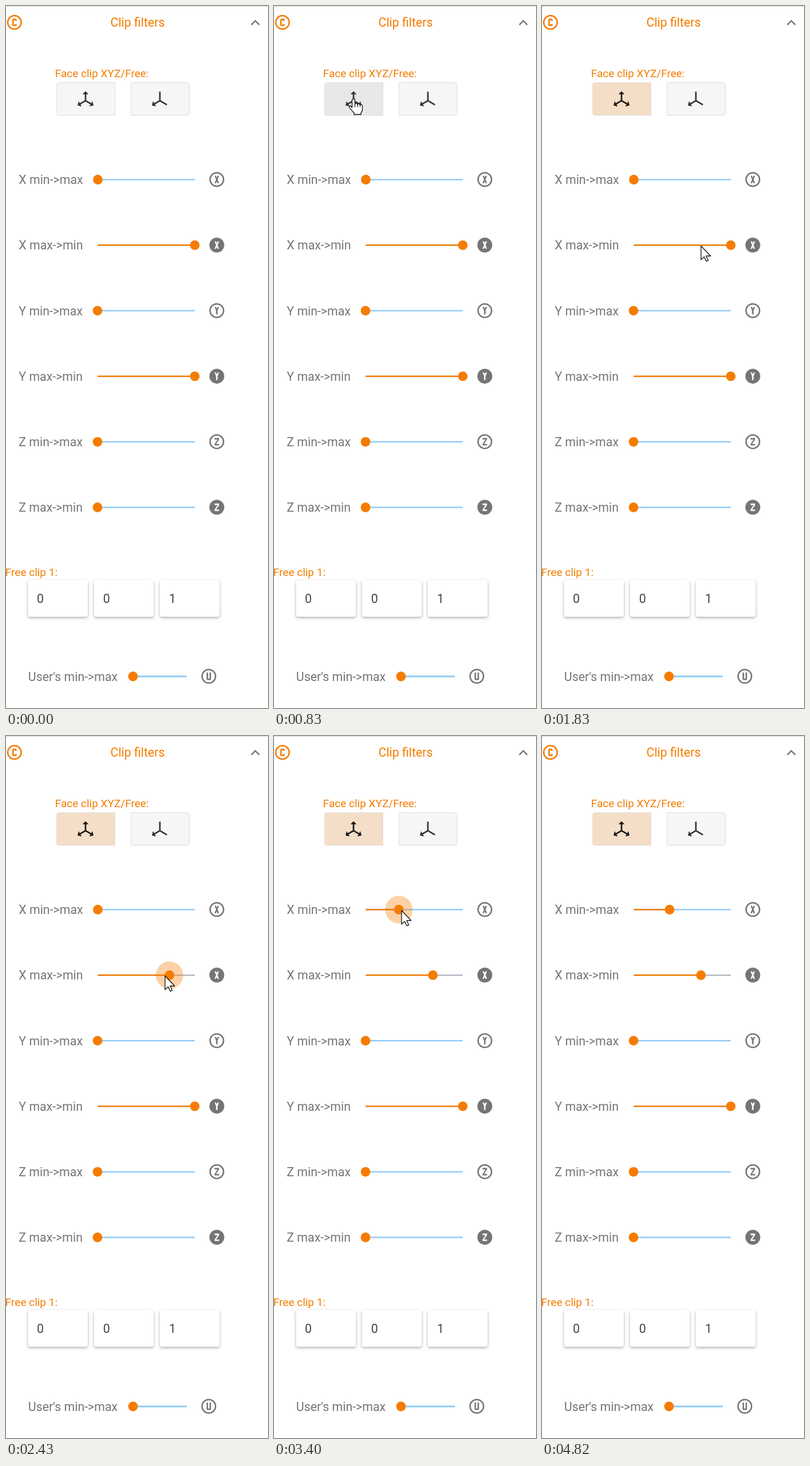
Animation of 458x1223 px, one loop 5600 ms. Source, as an HTML page with a canvas:

```html
<!DOCTYPE html>
<html lang="en">
<head>
<meta charset="utf-8">
<title>Clip filters</title>
<style>
html, body { margin: 0; width: 100%; height: 100%; overflow: hidden; background: #fff; }
canvas { display: block; width: 458px; height: 1223px; }
</style>
</head>
<body>
<canvas id="stage" width="458" height="1223"></canvas>
<script>
const ctx = document.getElementById('stage').getContext('2d');
const LOOP = 5600;
const ORANGE = '#f57c00', BLUE = '#90caf9', GRAY = '#757575', DIM = '#b5b7c4';

// Letter shapes on a 24-unit grid
const LETTERS = {
  X: 'M9 7L11 12L9 17H11L12 14.5L13 17H15L13 12L15 7H13L12 9.5L11 7Z',
  Y: 'M9 7L11 12V17H13V12L15 7H13L12 9.5L11 7Z',
  Z: 'M9 7V9H13L9 15V17H15V15H11L15 9V7Z',
  U: 'M9 7V15A2 2 0 0 0 11 17H13A2 2 0 0 0 15 15V7H13V15H11V7Z',
  C: 'M11 7A2 2 0 0 0 9 9V15A2 2 0 0 0 11 17H13A2 2 0 0 0 15 15V14H13V15H11V9H13V10H15V9A2 2 0 0 0 13 7Z'
};
for (const k in LETTERS) LETTERS[k] = new Path2D(LETTERS[k]);

const LEFT_ARM = 'L12 15.58L5.47 19.35L7 21.96L1.5 20.5L3 15.03L4.47 17.61L11 13.85';
const AXES = new Path2D('M12 2L16 6H13V13.85L19.53 17.61L21 15.03L22.5 20.5L17 21.96L18.53 19.35' + LEFT_ARM + 'V6H8Z');
const FREE_AXES = new Path2D('M13 2.6V13.85L21.7 18.87L20.7 20.6' + LEFT_ARM + 'V2.6Z');
const ARROW = new Path2D('M0 0V24L5.5 18.9L9.2 26.8L12.6 25.2L9 17.5H16.8Z');
const HAND = new Path2D('M-2.5 3a2.5 2.5 0 0 1 5 0V10a2.4 2.2 0 0 1 4.6 .6a2.4 2.2 0 0 1 4.4 1a2.2 2.2 0 0 1 4 1.6V19Q15.5 23 13 25V28H1V25.5Q-3 21 -6.7 16.6Q-8.5 13 -5.2 13L-2.5 16Z');
const KNUCKLES = new Path2D('M2.5 10V15M7.1 10.6V15M11.5 11.6V15');

// Pointer legs: [time, x, y]
const LEGS = [
  [[100, 417, 1161], [190, 405, 1050], [300, 365, 740], [400, 315, 470], [480, 273, 290],
   [540, 222, 213], [600, 160, 190], [650, 133, 167], [770, 139, 161]],
  [[900, 139, 161], [1010, 153, 218], [1070, 162, 261], [1160, 193, 323], [1230, 209, 344],
   [1500, 256, 394], [1830, 278, 418]],
  [[2430, 278, 418], [2630, 246, 350], [2820, 219, 293]],
  [[2870, 219, 293], [3060, 223, 304]],
  [[4110, 223, 304], [4140, 229, 316], [4250, 257, 445], [4400, 335, 750],
   [4550, 411, 1020], [4670, 445, 1140], [4820, 456, 1225]]
];

const clamp = v => Math.max(0, Math.min(1, v));
const phase = (t, from, to) => clamp((t - from) / (to - from));
const smooth = u => u * u * (3 - 2 * u);
const easeOut = u => 1 - Math.pow(1 - u, 3.5);

function slope(keys, i, axis) {
  if (i === 0 || i === keys.length - 1) return 0;
  const a = keys[i - 1], b = keys[i + 1];
  return (b[axis] - a[axis]) / (b[0] - a[0]);
}

function along(keys, t, axis) {
  const last = keys.length - 1;
  if (t >= keys[last][0]) return keys[last][axis];
  let i = 0;
  while (t >= keys[i + 1][0]) i++;
  const a = keys[i], b = keys[i + 1], d = b[0] - a[0], u = (t - a[0]) / d;
  const s = smooth(u), v = 1 - u;
  return a[axis] * (1 - s) + b[axis] * s +
    d * u * v * (slope(keys, i, axis) * v - slope(keys, i + 1, axis) * u);
}

function pointer(t) {
  if (t < 100 || t >= 4820) return null;
  const leg = LEGS.filter(keys => keys[0][0] <= t).pop();
  return [along(leg, t, 1), along(leg, t, 2)];
}

function text(str, x, y, size, color) {
  ctx.font = `400 ${size}px Roboto, sans-serif`;
  ctx.fillStyle = color;
  ctx.fillText(str, x, y);
}

function disc(x, y, r, color) {
  ctx.fillStyle = color;
  ctx.beginPath();
  ctx.arc(x, y, r, 0, Math.PI * 2);
  ctx.fill();
}

function line(x1, x2, y, w, color) {
  ctx.fillStyle = color;
  ctx.fillRect(x1, y - w / 2, x2 - x1, w);
}

function shape(path, x, y, scale, color) {
  ctx.save();
  ctx.translate(x, y);
  ctx.scale(scale, scale);
  ctx.fillStyle = color;
  ctx.fill(path);
  ctx.restore();
}

function badge(letter, x, y, color, solid) {
  if (solid) {
    disc(x, y, 13, color);
  } else {
    ctx.strokeStyle = color;
    ctx.lineWidth = 2.5;
    ctx.beginPath();
    ctx.arc(x, y, 11.8, 0, Math.PI * 2);
    ctx.stroke();
  }
  shape(LETTERS[letter], x - 15.6, y - 15.6, 1.3, solid ? '#fff' : color);
}

function slider(x1, x2, y, knob, halo, rest = BLUE, w = 2.4) {
  line(x1, x2, y, w, rest);
  line(x1, knob, y, w, ORANGE);
  if (halo > 0) disc(knob, y, 24 * halo, 'rgba(245,124,0,.35)');
  disc(knob, y, 8.4, ORANGE);
}

function button(x, radii, fill, overlay) {
  ctx.beginPath();
  ctx.roundRect(x + .5, 133.5, 102, 57, radii);
  ctx.fillStyle = fill;
  ctx.fill();
  if (overlay) {
    ctx.save();
    ctx.clip();
    overlay();
    ctx.restore();
    ctx.beginPath();
    ctx.roundRect(x + .5, 133.5, 102, 57, radii);
  }
  ctx.strokeStyle = '#dedede';
  ctx.lineWidth = 1;
  ctx.stroke();
}

function mix(a, b, u) {
  return `rgb(${a.map((v, i) => Math.round(v + (b[i] - v) * u))})`;
}

function buttons(t) {
  const hover = phase(t, 665, 780), pressed = phase(t, 900, 1020);
  const base = pressed > 0
    ? mix([232, 232, 232], [245, 222, 200], pressed)
    : mix([246, 246, 246], [232, 232, 232], hover);
  button(88, [4, 0, 0, 4], base, () => {
    const fade = 1 - smooth(phase(t, 1230, 1600));
    if (pressed > 0 && fade > 0) disc(139, 162, 70 * easeOut(phase(t, 900, 1150)), `rgba(246,170,90,${.4 * fade})`);
  });
  button(218, [0, 4, 4, 0], '#f6f6f6');
  shape(AXES, 123, 145.8, 4 / 3, pressed > 0 ? '#1c1a18' : '#333');
  shape(FREE_AXES, 253, 145.8, 4 / 3, '#333');
}

function card(x, digit, tx) {
  ctx.save();
  ctx.shadowColor = 'rgba(0,0,0,.32)';
  ctx.shadowBlur = 5;
  ctx.shadowOffsetY = 2;
  ctx.fillStyle = '#fff';
  ctx.beginPath();
  ctx.roundRect(x, 1000, 104.5, 64, 4);
  ctx.fill();
  ctx.restore();
  text(digit, tx, 1040, 21.33, '#424242');
}

function drawPointer(t) {
  const p = pointer(t);
  if (!p) return;
  const [x, y] = p;
  const overButton = x > 88 && x < 191 && y > 133 && y < 191;
  ctx.save();
  ctx.translate(x, y);
  ctx.fillStyle = '#fff';
  ctx.strokeStyle = '#111';
  ctx.lineWidth = 1.3;
  ctx.lineJoin = 'round';
  ctx.fill(overButton ? HAND : ARROW);
  ctx.stroke(overButton ? HAND : ARROW);
  if (overButton) ctx.stroke(KNUCKLES);
  ctx.restore();
}

function draw(t) {
  ctx.fillStyle = '#fff';
  ctx.fillRect(0, 0, 458, 1223);
  line(0, 458, .5, 1, '#d4d4d4');

  badge('C', 14.8, 28.6, ORANGE, false);
  text('Clip filters', 182.5, 36.3, 21.33, ORANGE);
  ctx.strokeStyle = GRAY;
  ctx.lineWidth = 2.4;
  ctx.beginPath();
  ctx.moveTo(428.8, 32.8);
  ctx.lineTo(435.8, 25.6);
  ctx.lineTo(442.8, 32.8);
  ctx.stroke();

  text('Face clip XYZ/Free:', 85.8, 124, 19, ORANGE);
  buttons(t);

  const maxMove = easeOut(phase(t, 2265, 2665)), minMove = easeOut(phase(t, 3185, 3600));
  const maxHalo = easeOut(phase(t, 2265, 2480)) * (1 - smooth(phase(t, 2580, 2800)));
  const minHalo = easeOut(phase(t, 3185, 3420)) * (1 - smooth(phase(t, 4210, 4440)));

  ['X', 'Y', 'Z'].forEach((axis, i) => {
    const y = 302.5 + i * 228.4, y2 = y + 114.2;
    const left = i ? 160 : 160.5;
    const low = i ? left : left + 62.5 * minMove;
    const high = [330 - 52.2 * maxMove, 330, left][i];
    text(axis + ' min->max', 22.3, y + 7.6, 21.33, GRAY);
    slider(left, 330, y, low, i ? 0 : minHalo);
    badge(axis, 368.5, y - .2, GRAY, false);
    text(axis + ' max->min', 22.3, y2 + 7.6, 21.33, GRAY);
    slider(left, 330, y2, high, i ? 0 : maxHalo, i ? BLUE : DIM);
    badge(axis, 368.5, y2 - .2, GRAY, true);
  });

  text('Free clip 1:', -1.2, 992.8, 19, ORANGE);
  card(38.5, '0', 54);
  card(153.7, '0', 169.7);
  card(269, '1', 285);

  text("User's min->max", 38.8, 1175.6, 21.33, GRAY);
  slider(222, 316, 1168, 222, 0, BLUE, 3);
  badge('U', 354.5, 1167.8, GRAY, false);

  drawPointer(t);
}

const start = performance.now();
function tick() {
  draw((performance.now() - start) % LOOP);
  requestAnimationFrame(tick);
}
tick();
</script>
</body>
</html>
```
